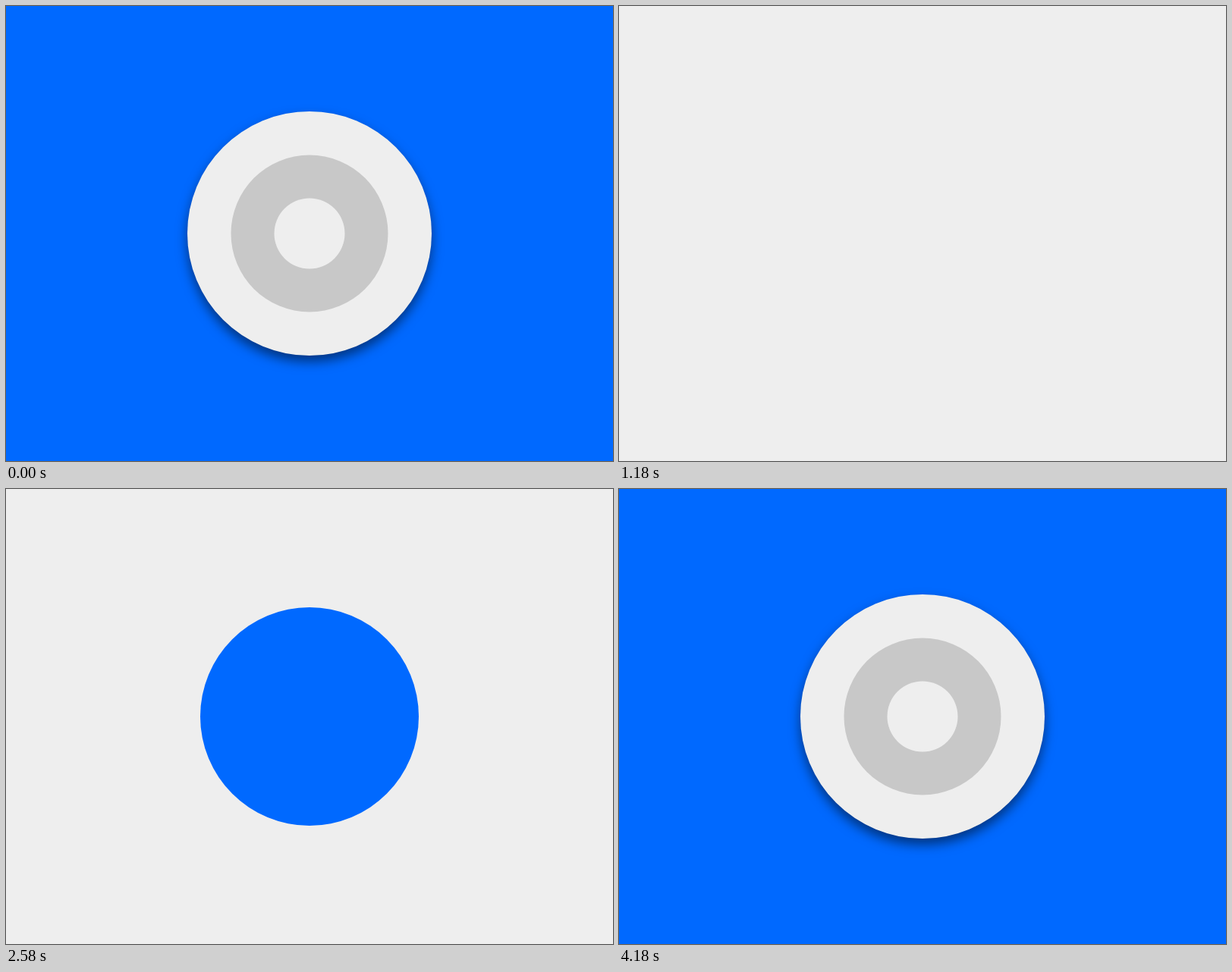
An HTML page with a canvas that plays this animation: 800x600 px, repeating every 4200 ms.

```html
<!DOCTYPE html>
<html lang="en">
<head>
<meta charset="utf-8">
<title>Pulse</title>
<style>
  html, body { margin: 0; width: 100%; height: 100%; overflow: hidden; background: #0069ff; }
  canvas { display: block; }
</style>
</head>
<body>
<canvas id="stage" width="800" height="600"></canvas>
<script>
const ctx = document.getElementById('stage').getContext('2d');
const BLUE = '#0069ff', LIGHT = '#eeeeee', RING = 'rgba(0,0,0,0.16)';
const LOOP = 4200, STEP = 20;
const OUTER = 161, MIDDLE = 103.5, INNER = 46.5;

// Time and radius of the circle that floods the stage.
const FLOOD = [
  [-60, 0], [160, 50], [380, 144], [460, 183], [540, 224],
  [640, 284], [860, 408], [1020, 469], [1180, 500.5], [1240, 506]
];

const sine = p => (1 - Math.cos(Math.PI * Math.min(1, Math.max(0, p)))) / 2;

function slope(keys, i) {
  const a = keys[Math.max(0, i - 1)], b = keys[Math.min(keys.length - 1, i + 1)];
  return (b[1] - a[1]) / (b[0] - a[0]);
}

// Smooth curve through a list of [time, value] keys.
function curve(keys, t) {
  const last = keys.length - 1;
  if (t <= keys[0][0]) return keys[0][1];
  if (t >= keys[last][0]) return keys[last][1];
  const i = keys.findIndex(k => k[0] > t) - 1;
  const [t0, v0] = keys[i], [t1, v1] = keys[i + 1];
  const d = t1 - t0, u = (t - t0) / d, u2 = u * u, u3 = u2 * u;
  const m0 = i === 0 ? 0.08 : slope(keys, i);
  return v0 * (2 * u3 - 3 * u2 + 1) + v1 * (3 * u2 - 2 * u3)
    + d * (m0 * (u3 - 2 * u2 + u) + slope(keys, i + 1) * (u3 - u2));
}

// Scale of the ringed button: pops up, swells a little, then sinks away.
function popScale(t, lag) {
  if (t < -220) return sine((t + 620 - lag) / 400);
  if (t < 0) return 1 + 0.012 * Math.sin(Math.PI * (t + 220) / 220);
  return sine((400 - lag - t) / (400 - lag));
}

function disc(r, color) {
  if (r <= 0) return;
  ctx.fillStyle = color;
  ctx.beginPath();
  ctx.arc(400, 300, r, 0, 2 * Math.PI);
  ctx.fill();
}

function button(t, color) {
  const s = popScale(t, 0), inner = popScale(t, 5);
  ctx.save();
  ctx.shadowColor = 'rgba(0,0,0,0.5)';
  ctx.shadowBlur = 15 * s;
  ctx.shadowOffsetY = 8 * s;
  disc(OUTER * s, color);
  ctx.restore();
  disc(MIDDLE * inner, RING);
  disc(INNER * inner, color);
}

function draw(ms) {
  const t = Math.floor((ms % LOOP) / STEP) * STEP;
  const onLight = t >= 1390 && t < 3590;
  const local = onLight ? t - 2200 : t < 1390 ? t : t - 4400;
  const color = onLight ? BLUE : LIGHT;
  ctx.fillStyle = onLight ? LIGHT : BLUE;
  ctx.fillRect(0, 0, 800, 600);
  button(local, color);
  disc(curve(FLOOD, local), color);
}

function tick() {
  draw(performance.now());
  requestAnimationFrame(tick);
}
tick();
</script>
</body>
</html>
```
